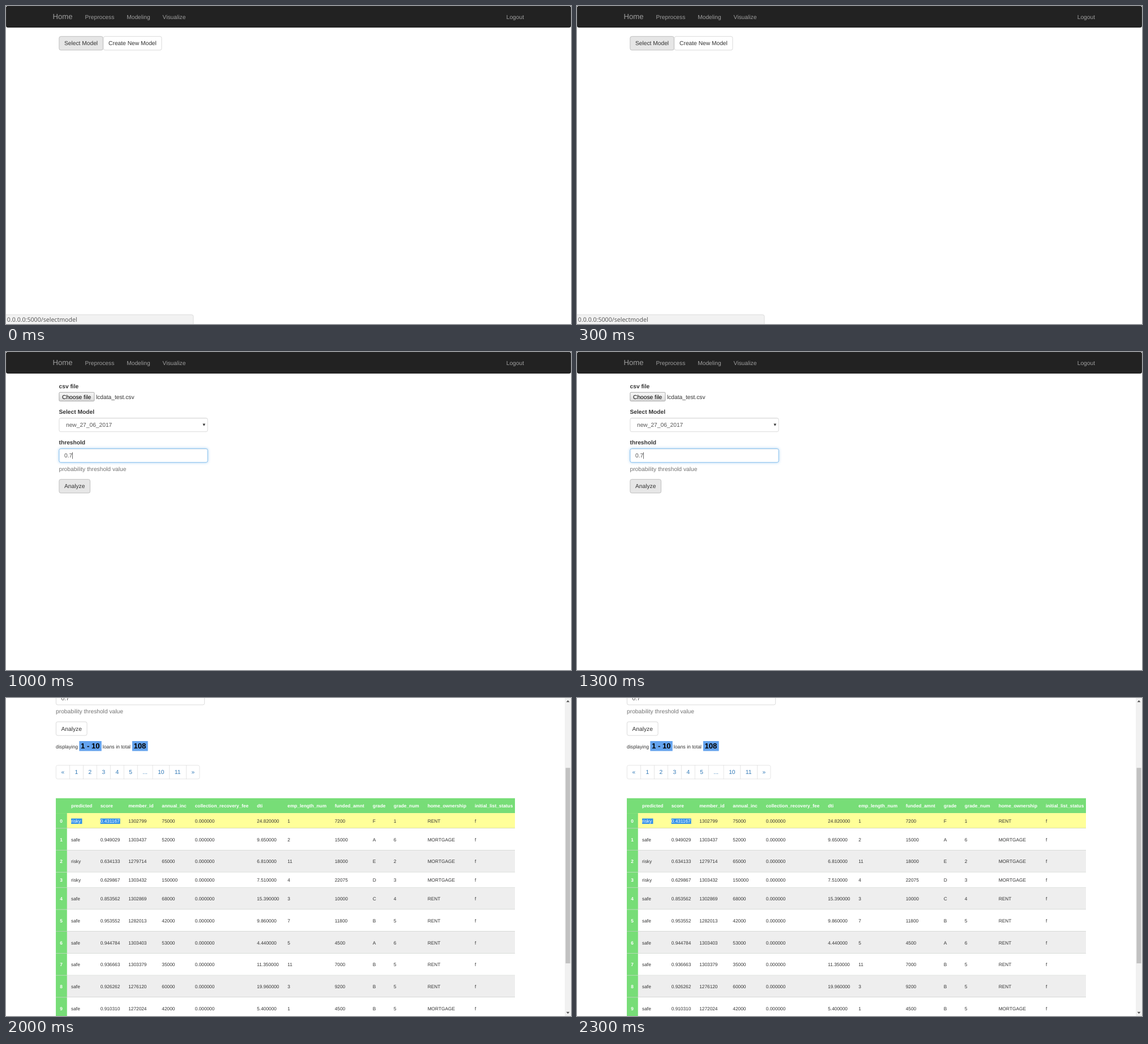
Recreate the animation shown at these times as an HTML page. Size 998 by 561 pixels, loop 2500 ms.

```html
<!DOCTYPE html>
<html lang="en">
<head>
<meta charset="utf-8">
<title>Loan model</title>
<style>
  html, body { margin: 0; width: 100%; height: 100%; overflow: hidden; background: #fff; }
  svg { display: block; width: 998px; height: 561px; }
  text { font-family: "Liberation Sans", Arial, sans-serif; white-space: pre; text-rendering: geometricPrecision; }
</style>
</head>
<body>
<svg id="stage" viewBox="0 0 998 561">
  <defs>
    <linearGradient id="face" x2="0" y2="1">
      <stop offset="0" stop-color="#f8f8f8"/><stop offset="1" stop-color="#dcdcdc"/>
    </linearGradient>
    <filter id="glow" x="-10%" y="-60%" width="120%" height="220%"><feGaussianBlur stdDeviation="3.5"/></filter>
  </defs>
  <g id="page"></g>
</svg>
<script>
const SCALE = 998 / 1366;   // layout is in browser pixels, 1366 x 768
const STEP = 500;
const CELL = 11.36;
const page = document.getElementById('page');
page.setAttribute('transform', `scale(${SCALE})`);

const text = (x, y, str, fill = '#333', size = 14, extra = '') =>
  `<text x="${x}" y="${y}" font-size="${size}" fill="${fill}" ${extra}>${str}</text>`;
const bold = (x, y, str, fill, size, extra = '') => text(x, y, str, fill, size, 'font-weight="700" ' + extra);
const rect = (x, y, w, h, fill, extra = '') =>
  `<rect x="${x}" y="${y}" width="${w}" height="${h}" fill="${fill}" ${extra}/>`;
const box = (x, y, w, h, fill, stroke, r = 4) =>
  rect(x + .5, y + .5, w - 1, h - 1, fill, `stroke="${stroke}" rx="${r}"`);
const tri = (d, fill) => `<path d="${d}" fill="${fill}"/>`;
const shift = (x, y, body) => `<g transform="translate(${x} ${y})">${body}</g>`;

function navbar(width) {
  const dx = (width - 1366) / 2;
  const links = [[191, 'Preprocess'], [291.8, 'Modeling'], [378.6, 'Visualize'], [1209.6, 'Logout']];
  return box(0, 0, width, 52, '#222', '#080808') + shift(dx, 0,
    text(113, 32, 'Home', '#9d9d9d', 18) + links.map(([x, s]) => text(x, 31, s, '#9d9d9d')).join(''));
}

function button(x, y, w, label, active) {
  return box(x, y, w, 34, active ? '#e6e6e6' : '#fff', active ? '#adadad' : '#ccc') +
    text(x + 13, y + 22, label);
}

function field(y, focused) {
  const glow = focused ? rect(128, y, 360, 34, '#66afe9', 'rx="4" opacity=".6" filter="url(#glow)"') : '';
  return glow + box(128, y, 360, 34, '#fff', focused ? '#66afe9' : '#ccc') +
    rect(130, y + 1, 356, 1, '#000', 'opacity=".07"');
}

function form({ file, value = '', focused, active }) {
  return bold(128, 87, 'csv file') +
    box(128, 97, 86, 22, 'url(#face)', '#8a8a8a', 2) + text(135.5, 113, 'Choose file', '#000') +
    text(217.5, 113, file) +
    bold(128, 149, 'Select Model') + field(159) + text(145, 181, 'new_27_06_2017', '#555') +
    tri('M475.5 173h6.4l-3.2 6z', '#333') +
    bold(128, 223, 'threshold') + field(233, focused) + text(141, 255, value, '#555') +
    (focused ? rect(160.3, 242, 1, 16, '#333') : '') +
    text(128, 287, 'probability threshold value', '#737373') +
    button(128, 307, 75.8, 'Analyze', active);
}

function summary() {
  const mark = '#64a3ee';
  return text(120.5, 372, 'displaying', '#333', 12) +
    rect(177, 354, 54, 24, mark) + bold(180.6, 372, '1 - 10', '#000', 18) +
    text(233.7, 372, 'loans in total', '#333', 12) +
    rect(305, 354, 38, 24, mark) + bold(308.6, 372, '108', '#000', 18);
}

function pager() {
  const labels = ['«', 1, 2, 3, 4, 5, '...', 10, 11, '»'];
  let x = 120.5, out = box(x, 412, 348, 34, '#fff', '#ddd');
  labels.forEach((s, i) => {
    const w = s === '...' ? 36.7 : s > 9 ? 40.6 : 32.8;
    if (i) out += rect(x, 412, 1, 34, '#ddd');
    out += text(x + 13, 434, s, '#337ab7');
    x += w;
  });
  return out;
}

const COLS = [157.5, 228.2, 295.9, 376.9, 456.8, 606.7, 680.7, 794.8, 886.7, 937.4, 1019.3, 1133.2];
const HEADS = ('predicted score member_id annual_inc collection_recovery_fee dti emp_length_num ' +
  'funded_amnt grade grade_num home_ownership initial_list_status').split(' ');
// predicted, score, member, income, dti, employment, funded, grade, home
const LOANS = `risky 0.431167 1302799 75000 24.82 1 7200 F RENT
safe 0.949029 1303437 52000 9.65 2 15000 A MORTGAGE
risky 0.634133 1279714 65000 6.81 11 18000 E MORTGAGE
risky 0.629867 1303432 150000 7.51 4 22075 D MORTGAGE
safe 0.853562 1302869 68000 15.39 3 10000 C RENT
safe 0.953552 1282013 42000 9.86 7 11800 B RENT
safe 0.944784 1303403 53000 4.44 5 4500 A RENT
safe 0.936663 1303379 35000 11.35 11 7000 B RENT
safe 0.926262 1276120 60000 19.96 3 9200 B RENT
safe 0.910310 1272024 42000 5.40 1 4500 B MORTGAGE`.split('\n').map(line => {
  const [kind, score, id, income, dti, years, amount, grade, home] = line.split(' ');
  const rank = 6 - 'ABCDEF'.indexOf(grade);
  return [kind, score, id, income, '0.000000', dti + '0000', years, amount, grade, rank, home, 'f'];
});

function table(picked) {
  const left = 120.5, width = 1110, green = '#77dd77';
  let y = 528;
  let out = rect(left, 492, width, 36, green) +
    HEADS.map((s, i) => bold(COLS[i], 514, s, '#fff', CELL)).join('');
  LOANS.forEach((row, n) => {
    const h = n === 0 || n === 3 ? 37 : 53;
    const base = y + h / 2 + 4.3;
    const hot = picked && n === 0;
    out += rect(left, y, width, h, hot ? '#ffff99' : n % 2 ? '#fff' : '#eee') +
      rect(left, y, 27, h, green) +
      rect(left, y + h - 1, width, 1, '#c4c8c4');
    if (hot) out += rect(157.5, 541, 26.5, 13, '#3090ea') + rect(228.2, 541, 47.8, 13, '#3090ea');
    out += bold(133.6, base, n, '#fff', CELL, 'text-anchor="middle"') +
      row.map((s, i) => text(COLS[i], base, s, hot && i < 2 ? '#fff' : '#333', CELL)).join('');
    y += h;
  });
  return out;
}

function scrollbar(top) {
  const thumb = 15 + top * 738 / 1200;
  return rect(1351, 0, 15, 768, '#f1f1f1') + rect(1353, thumb, 11, 472, '#c1c1c1') +
    tri('M1354.5 10h8l-4-4.5z', top ? '#505050' : '#a3a3a3') +
    tri('M1354.5 758h8l-4 4.5z', '#505050');
}

function results(top) {
  const body = navbar(1351) +
    shift(-7.5, 0, form({ file: 'No file chosen', value: '0.7', active: !top })) +
    summary() + pager() + table(top > 0);
  return shift(0, -top, body) + scrollbar(top);
}

function menu() {
  return navbar(1366) + button(128, 73, 106.9, 'Select Model', true) +
    button(234.9, 73, 141.9, 'Create New Model') +
    '<path d="M-1 745.5H449a4 4 0 0 1 4 4V770H-1z" fill="#f2f2f2" stroke="#d4d4d4"/>' +
    text(2.5, 762, '0.0.0.0:5000/selectmodel', '#505050', 14.55, 'style="font-family:\'Open Sans\',sans-serif"');
}

const upload = state => navbar(1366) + form({ file: 'lcdata_test.csv', ...state });

const scenes = [
  menu(),
  upload({}),
  upload({ value: '0.7', focused: true, active: true }),
  results(0),
  results(250)
];

let shown = -1;
function draw(now) {
  const i = Math.floor(now / STEP) % scenes.length;
  if (i !== shown) page.innerHTML = scenes[shown = i];
}

const start = performance.now();
function tick() {
  draw(performance.now() - start);
  requestAnimationFrame(tick);
}
tick();
</script>
</body>
</html>
```
